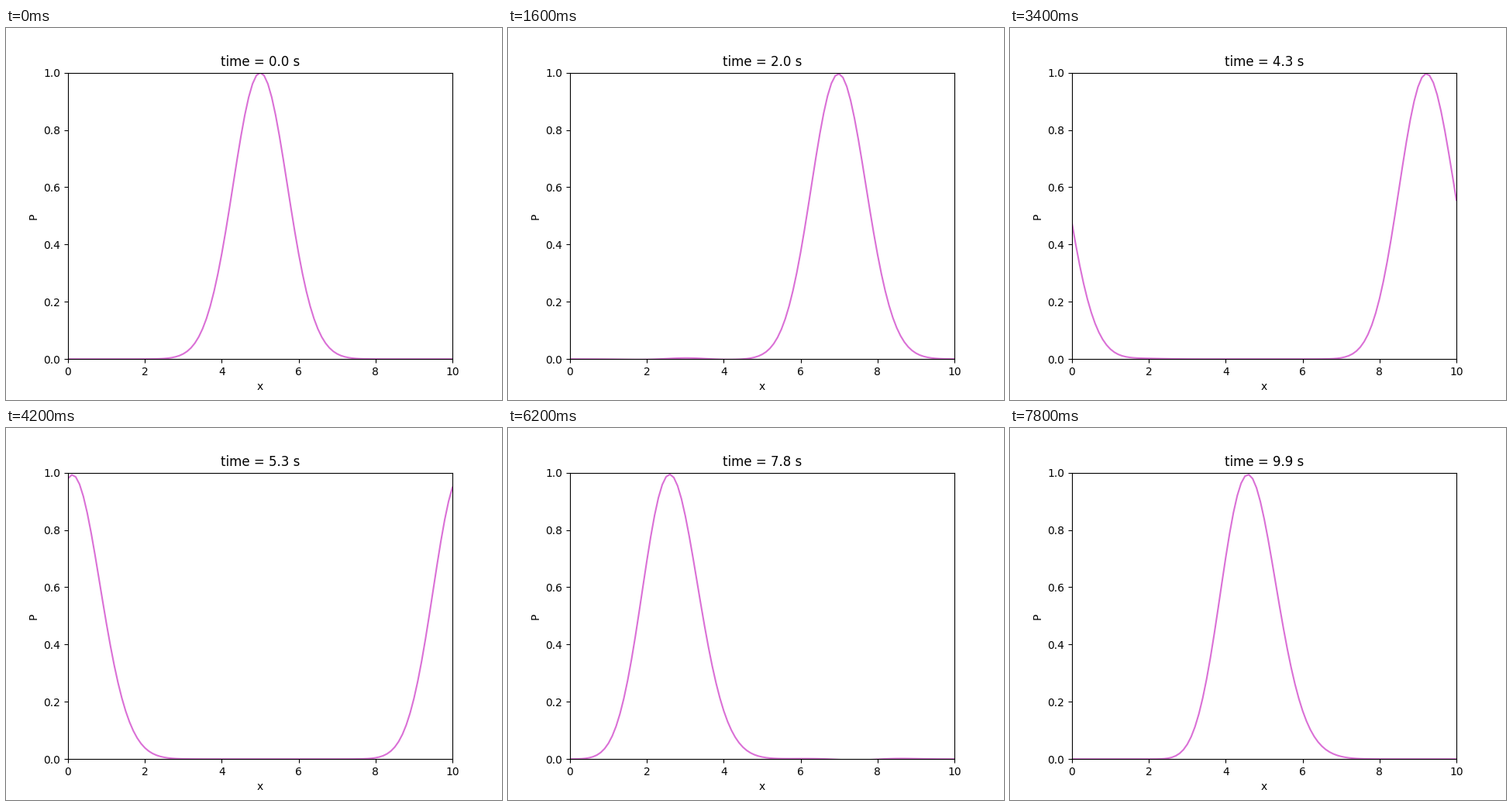
A matplotlib script for the animation above (8 s loop, 640 by 480 pixels).

```python
import numpy as np
import matplotlib.pyplot as plt
from matplotlib.animation import FuncAnimation

FRAMES = 40
STEPS_PER_FRAME = 5
COURANT = 0.5

x = np.linspace(0, 10, 101)
times = np.linspace(0, 20, 80)


def neighbours(u):
    """Right and left neighbours on a periodic grid."""
    return np.roll(u, -1), np.roll(u, 1)


def solve(u, steps):
    """Advect u to the right: one Lax step, then leapfrog."""
    right, left = neighbours(u)
    history = [u, (right + left) / 2 - COURANT / 2 * (right - left)]
    while len(history) <= steps:
        right, left = neighbours(history[-1])
        history.append(history[-2] - COURANT * (right - left))
    return history


history = solve(np.exp(-(x - 5) ** 2), FRAMES * STEPS_PER_FRAME)

fig, ax = plt.subplots(figsize=(6.4, 4.8), dpi=100)
line, = ax.plot(x, history[0], color="orchid")
ax.set(xlim=(0, 10), ylim=(0, 1), xlabel="x", ylabel="P")
title = ax.set_title("time = 0.0 s")


def update(frame):
    line.set_ydata(history[frame * STEPS_PER_FRAME])
    title.set_text(f"time = {times[frame]:.1f} s")
    return line, title


anim = FuncAnimation(fig, update, frames=FRAMES, interval=200, repeat=True)
plt.show()
```
